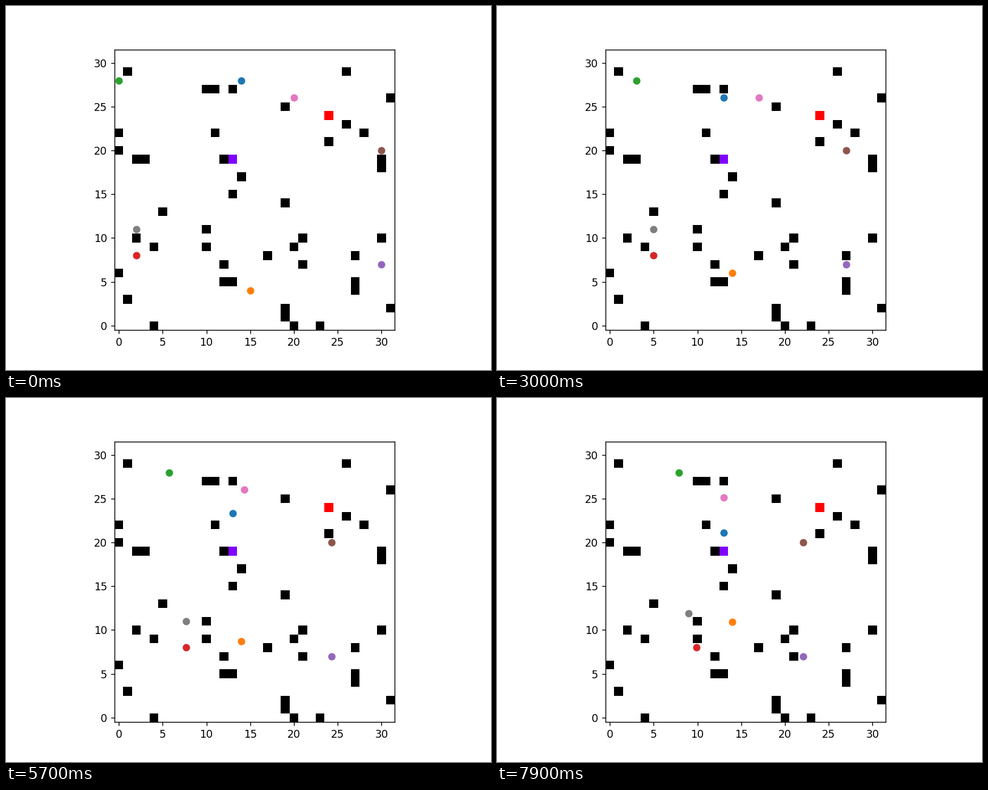
These frames come from a looping animation (800 px wide and 600 px high, 8 s). A matplotlib script:

```python
import numpy as np
import matplotlib.pyplot as plt
from matplotlib.animation import FuncAnimation

SIZE = 32
STEPS = 8
SUBSTEPS = 10
GOAL = (13, 19)
MARK = (24, 24)

# Map: row -> columns of blocked cells
WALL_ROWS = {
    0: (4, 20, 23), 1: (19,), 2: (19, 31), 3: (1,), 4: (27,),
    5: (12, 13, 27), 6: (0,), 7: (12, 21), 8: (17, 27), 9: (4, 10, 20),
    10: (2, 21, 30), 11: (10,), 13: (5,), 14: (19,), 15: (13,), 17: (14,),
    18: (30,), 19: (2, 3, 12, 30), 20: (0,), 21: (24,), 22: (0, 11, 28),
    23: (26,), 25: (19,), 26: (31,), 27: (10, 11, 13), 29: (1, 26),
}
WALLS = {(x, y) for y, cols in WALL_ROWS.items() for x in cols}
STARTS = [(14, 28), (15, 4), (0, 28), (2, 8),
          (30, 7), (30, 20), (20, 26), (2, 11)]


def neighbours(cell):
    """Free cells next to this one, sideways moves first."""
    x, y = cell
    for nxt in ((x - 1, y), (x + 1, y), (x, y - 1), (x, y + 1)):
        if 0 <= min(nxt) and max(nxt) < SIZE and nxt not in WALLS:
            yield nxt


def distances(goal):
    """Breadth-first walking distance of every cell to the goal."""
    dist = {goal: 0}
    queue = [goal]
    for cell in queue:
        for nxt in neighbours(cell):
            if nxt not in dist:
                dist[nxt] = dist[cell] + 1
                queue.append(nxt)
    return dist


def find_route(start, dist):
    route = [start]
    for _ in range(STEPS):
        # min keeps the first of equals, so sideways moves win ties
        route.append(min(neighbours(route[-1]), key=dist.get))
    return np.array(route)


def make_grid():
    grid = np.ones((SIZE, SIZE, 3))
    for x, y in WALLS:
        grid[y, x] = 0
    grid[GOAL[::-1]] = (0.5, 0, 1)
    grid[MARK[::-1]] = (1, 0, 0)
    return grid


dist = distances(GOAL)
routes = [find_route(start, dist) for start in STARTS]

fig, ax = plt.subplots(figsize=(6.4, 4.8), dpi=125)
ax.imshow(make_grid(), origin="lower", interpolation="nearest")
ax.set_xticks(range(0, SIZE, 5))
ax.set_yticks(range(0, SIZE, 5))
ax.set_xlim(-0.5, SIZE - 0.5)
ax.set_ylim(-0.5, SIZE - 0.5)
agents = [ax.plot(*start, "o")[0] for start in STARTS]


def update(frame):
    step, part = divmod(frame, SUBSTEPS)
    for agent, route in zip(agents, routes):
        x, y = route[step] + (route[step + 1] - route[step]) * part / SUBSTEPS
        agent.set_data([x], [y])
    return agents


anim = FuncAnimation(fig, update, frames=STEPS * SUBSTEPS, interval=100,
                     repeat=True)
plt.show()
```
